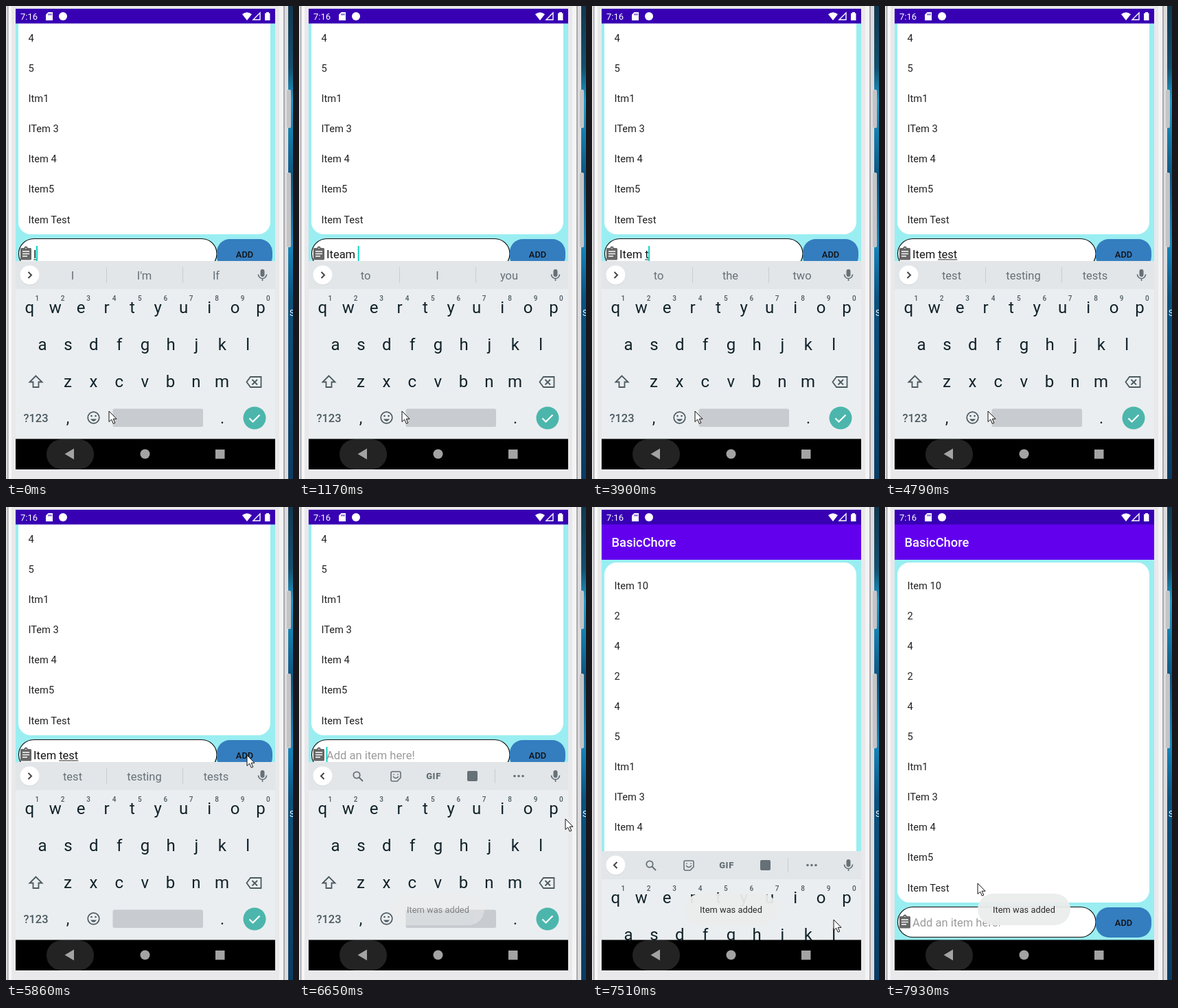
An HTML page that plays this animation: 418 by 690 pixels, repeating every 8000 ms.

```html
<!DOCTYPE html>
<html lang="en">
<head>
<meta charset="utf-8">
<title>Adding an item</title>
<style>
  html, body { margin: 0; width: 100%; height: 100%; overflow: hidden; background: #e9e8eb; }
  svg { display: block; font-family: Roboto, sans-serif; }
  text { white-space: pre; }
</style>
</head>
<body>
<svg id="stage" width="418" height="690" viewBox="0 0 418 690"></svg>
<script>
const LOOP = 8000;
const LIFT = 244; // how far the open keyboard pushes the page up
const stage = document.getElementById('stage');
const pen = document.createElement('canvas').getContext('2d');

// Each step lists only what changes from the one before it.
const steps = [
  [0, { text: 'I', mark: 0, caret: 1, words: ['I', "I'm", 'If'], mouse: [150, 591], keyboard: 0, toast: 0 }],
  [270, { text: 'It', words: ['It', "It's", 'Its'] }],
  [420, { text: 'Ite', words: ['It', 'Item', 'Items'] }],
  [570, { text: 'Itea', words: ['Item', 'Itea', 'Items'] }],
  [720, { text: 'Iteam' }],
  [870, { words: ['Team', 'Iteam', 'Steam'] }],
  [1020, { text: 'Iteam ', mark: -1 }],
  [1170, { words: ['to', 'I', 'you'] }],
  [1600, { caret: 0 }],
  [1880, { text: 'Iteam', mark: 0, caret: 1, words: ['Team', 'Iteam', 'Steam'] }],
  [2000, { text: 'Itea', words: ['Item', 'Itea', 'Items'] }],
  [2120, { text: 'Ite' }],
  [2390, { caret: 0, words: ['It', 'Item', 'Items'] }],
  [2790, { text: 'Item', caret: 1 }],
  [2920, { words: ['Item', 'Items', 'Item is'] }],
  [3350, { text: 'Item ', mark: -1 }],
  [3500, { words: ['is', 'and', 'to'] }],
  [3900, { text: 'Item t', mark: 5, words: ['to', 'the', 'two'] }],
  [4170, { text: 'Item tes', words: ['test', 'tested', 'testing'] }],
  [4290, { text: 'Item test', words: ['test', 'testing', 'tests'] }],
  [4790, { caret: 0 }],
  [5060, { mouse: [158, 580] }],
  [5220, { mouse: [196, 528] }],
  [5380, { mouse: [256, 456], caret: 1 }],
  [5540, { mouse: [314, 396] }],
  [5700, { mouse: [344, 367] }],
  [5860, { mouse: [351, 362], caret: 0 }],
  [6260, { mouse: [352, 366], text: '', mark: -1, caret: 1 }],
  [6397, { mouse: [362, 390], words: null }],
  [6533, { mouse: [388, 455], toast: .5 }],
  [6670, { mouse: [406, 545], toast: 1 }],
  [6807, { mouse: [392, 612] }],
  [6943, { mouse: [370, 622], caret: 0 }],
  [7080, { mouse: [360, 603] }],
  [7360, { caret: 1, pressed: true }],
  [7510, { keyboard: 130, mouse: [352, 602] }],
  [7660, { keyboard: 260, mouse: [305, 598] }],
  [7930, { caret: 0, mouse: [135, 549] }],
];
let last = {};
const states = steps.map(([at, change]) => last = { ...last, ...change, at });

const rect = (x, y, w, h, fill, more = '') =>
  `<rect x="${x}" y="${y}" width="${w}" height="${h}" fill="${fill}" ${more}/>`;
const disc = (x, y, r, fill, more = '') => `<circle cx="${x}" cy="${y}" r="${r}" fill="${fill}" ${more}/>`;
const path = (d, fill, more = '') => `<path d="${d}" fill="${fill}" ${more}/>`;
const line = (d, color, width = 2) => path(d, 'none', `stroke="${color}" stroke-width="${width}"`);
const label = (x, y, size, fill, text, more = '') =>
  `<text x="${x}" y="${y}" font-size="${size}" fill="${fill}" ${more}>${text}</text>`;
const centred = (x, y, size, fill, text, more = '') =>
  label(x, y, size, fill, text, `text-anchor="middle" ${more}`);
const clipped = (x, y, w, h, inner) =>
  `<svg x="${x}" y="${y}" width="${w}" height="${h}" viewBox="${x} ${y} ${w} ${h}">${inner}</svg>`;

function textWidth(text) {
  pen.font = '16.5px Roboto, sans-serif';
  return pen.measureText(text).width;
}

function phone() {
  return `<defs><linearGradient id="sky" x2="0" y2="1">
      <stop offset="0" stop-color="#12384f"/><stop offset=".13" stop-color="#14506f"/>
      <stop offset=".2" stop-color="#1c9ccb"/><stop offset=".36" stop-color="#0d5580"/>
      <stop offset=".5" stop-color="#1688bd"/><stop offset=".62" stop-color="#0b527f"/>
      <stop offset="1" stop-color="#0a3c63"/></linearGradient></defs>`
    + rect(0, 0, 418, 690, '#e9e8eb')
    + rect(0, 0, 3, 690, '#dddcdf') + rect(2, 0, 1.5, 690, '#aaa9ad') + rect(4, 0, 4, 690, '#f7f7f8')
    + rect(398, 0, 6, 690, '#f4f4f5') + rect(404, 0, 2, 690, '#a9a9ad') + rect(406, 0, 5, 690, '#dcdcdf')
    + rect(411, 0, 7, 690, 'url(#sky)')
    + rect(409, 122, 6, 56, '#c4c4c7', 'rx="2"') + rect(409, 243, 6, 109, '#c4c4c7', 'rx="2"')
    + label(413, 452, 12, '#fff', 'S');
}

function statusBar() {
  return rect(14, 4, 378, 21.5, '#3700b3')
    + label(21, 20, 13, '#fff', '7:16')
    + path('M61.5 9H68V21H58V12.5Z', '#fff') + line('M62 11V13.5M64 11V13.5M66 11V13.5', '#3700b3', 1)
    + disc(83, 15, 6, '#fff')
    + path('M344 12Q351 6.500 358 12L351 21Z', '#fff')
    + line('M370 10V20H360Z', '#fff', 1.4)
    + path('M377 10.500H379V9H383V10.500H384.500V21H377Z', '#fff');
}

function page(s) {
  const items = ['Item 10', '2', '4', '2', '4', '5', 'Itm1', 'ITem 3', 'Item 4', 'Item5', 'Item Test'];
  const left = 40, base = 612;
  const end = left + textWidth(s.text);
  let field = s.text ? label(left, base, 16.5, '#151515', s.text)
                     : label(left, base, 16.5, '#9b9b9b', 'Add an item here!');
  if (s.mark >= 0) {
    const from = left + textWidth(s.text.slice(0, s.mark));
    field += rect(from, base + 1.5, end - from, 1, '#222');
  }
  if (s.caret) field += rect(end - .5, 594, 2, 23, '#0fd3c3');
  return rect(14, 25, 378, 607, '#9aeef1')
    + rect(14, 25, 378, 52, '#6200ee')
    + label(28.5, 58, 18.3, '#fff', 'BasicChore', 'font-weight="500"')
    + rect(18, 81, 367, 496, '#fff', 'rx="18"')
    + items.map((item, i) => label(32.5, 120 + 44.05 * i, 14.67, '#212121', item)).join('')
    + rect(18.5, 583.5, 288.5, 44, '#fff', 'rx="22" stroke="#111" stroke-width="1.2"')
    + rect(307, 584, 81, 44, '#347dbf', 'rx="19"')
    + centred(347.5, 611, 12.83, '#111', 'ADD', 'font-weight="500"')
    + rect(21, 597, 16, 17.5, '#666', 'rx="1.500"') + disc(29, 597, 2.6, '#666') + disc(29, 597.5, .8, '#fff')
    + line('M24 602H34M24 605.500H34M24 609H31', '#fff', 1.5)
    + field;
}

function strip(s) {
  const grey = '#667077';
  let inner = rect(14, 372, 378, 41, '#e2e6e9')
    + disc(34.5, 393.3, 14, '#c9cdd0') + disc(34.5, 392.5, 14, '#fff')
    + rect(370.5, 384, 6, 11, grey, 'rx="3"') + line('M367.500 391.500A6 6 0 0 0 379.500 391.500M373.500 397V401', grey, 1.7);
  if (s.words) {
    return inner + line('M32.500 388L37 392.500 32.500 397', '#444')
      + line('M146.500 381V404M257.500 381V404', '#c8cdd1', 1)
      + s.words.map((word, i) => centred(97 + 104.5 * i, 399, 16.5, grey, word)).join('');
  }
  return inner + line('M36.500 388L32 392.500 36.500 397', '#444')
    + disc(84, 391, 4.7, 'none', `stroke="${grey}" stroke-width="1.800"`) + line('M87.500 394.500L93 400', grey)
    + path('M136 386H146Q148 386 148 388V395L143 400H136Q134 400 134 398V388Q134 386 136 386Z', 'none',
           `stroke="${grey}" stroke-width="1.600"`)
    + line('M137 393Q141 398 145 393M138 389.500V391M144 389.500V391', grey, 1.5)
    + centred(196, 397, 13, grey, 'GIF', 'font-weight="900" letter-spacing=".6"')
    + rect(245, 385, 15, 15, grey, 'rx="2"')
    + line('M285.500 382V403', '#c8cdd1', 1)
    + [314, 320, 326].map(x => disc(x, 392.5, 1.8, grey)).join('');
}

function keyboard(s) {
  const ink = '#10222a', soft = '#4b5a61';
  const rows = [['qwertyuiop', 34.3, 447.5], ['asdfghjkl', 53, 501.5], ['zxcvbnm', 90, 556]];
  const keys = rows.map(([letters, x, y]) =>
    [...letters].map((key, i) => centred(x + 37.4 * i, y, 24, ink, key)).join('')).join('');
  const digits = [...'1234567890'].map((n, i) => centred(45.3 + 37.4 * i, 429.5, 10, soft, n, 'font-weight="500"')).join('');
  return rect(14, 372, 378, 260, '#ebeef0') + strip(s) + keys + digits
    + line('M43.500 539.500L34.500 548.500H39.500V556H47.500V548.500H52.500Z', soft, 1.8)
    + line('M356 541H371.500V556H356L350.500 548.500ZM358.500 545L366 552.500M366 545L358.500 552.500', soft, 1.8)
    + centred(43.5, 607, 16.5, soft, '?123', 'font-weight="500"')
    + centred(90, 609, 23, ink, ',') + centred(315, 609, 23, ink, '.')
    + disc(127.5, 600.5, 8.3, 'none', `stroke="${soft}" stroke-width="1.700"`)
    + disc(124.5, 598, 1.3, soft) + disc(130.5, 598, 1.3, soft)
    + path('M123 602.500H132Q127.500 609 123 602.500Z', soft)
    + rect(155.5, 587.5, 131.5, 26.5, '#c8ccd0', 'rx="2.500"')
    + disc(362, 601, 16.5, s.pressed ? '#05a294' : '#4cb6ac')
    + line('M354.500 601.500L359.500 606.500 369.500 596.500', '#fff', 2.2);
}

function navBar() {
  const grey = '#a3a3a3';
  return rect(14, 631.5, 378, 44.5, '#000')
    + rect(59, 632, 69, 44, '#232323', 'rx="22"')
    + path('M85.500 653.500L99 645.500V661.500Z', grey)
    + disc(202.5, 653.5, 7, grey) + rect(305, 647, 13.5, 13.5, grey);
}

const toast = s => `<g opacity="${s.toast}">`
  + rect(135, 564, 135, 46, '#ebecec', 'rx="23" fill-opacity=".94"')
  + centred(202.5, 592, 12.83, '#2b2b2b', 'Item was added') + '</g>';

const pointer = ([x, y]) =>
  path('M0 0V15.500L3.700 12.200 6.300 18.200 8.800 17.100 6.200 11.300H11Z', '#fff',
       `stroke="#111" stroke-width="1" transform="translate(${x} ${y})"`);

function draw(s) {
  const open = s.keyboard === 0;
  const lift = open ? LIFT : 0;
  stage.innerHTML = phone()
    + clipped(14, 25, 378, open ? 347 : 607, `<g transform="translate(0 ${-lift})">${page(s)}</g>`)
    + statusBar()
    + clipped(14, 372, 378, 260, `<g transform="translate(0 ${s.keyboard})">${keyboard(s)}</g>`)
    + navBar() + toast(s) + pointer(s.mouse);
}

let shown;
function tick() {
  const now = performance.now() % LOOP;
  const state = states.findLast(s => s.at <= now);
  if (state !== shown) draw(shown = state);
  requestAnimationFrame(tick);
}
tick();
</script>
</body>
</html>
```
